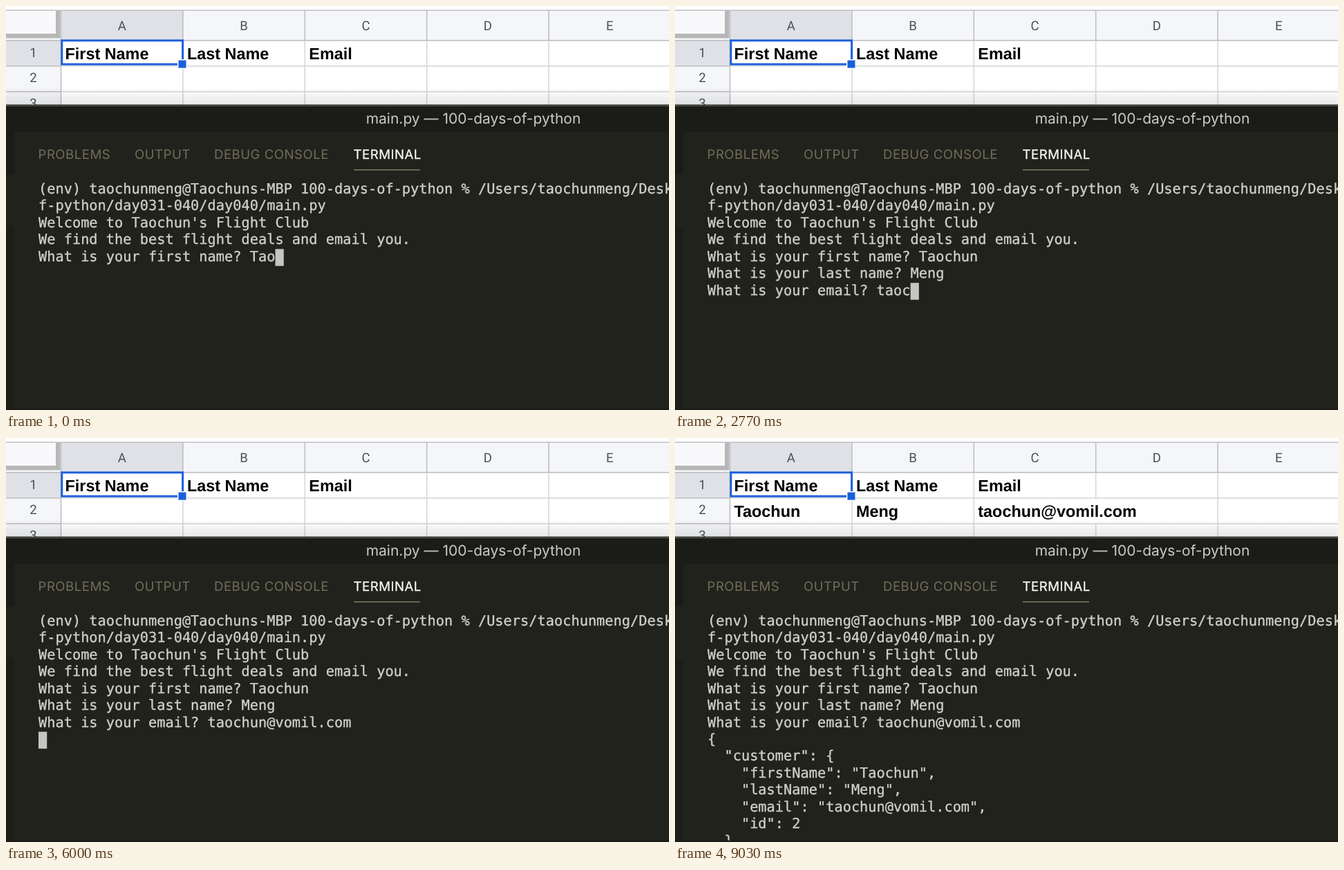
An HTML page that plays this animation: 959 px wide and 584 px high, repeating every 9.51 s.

```html
<!DOCTYPE html>
<html lang="en">
<head>
<meta charset="utf-8">
<title>Flight club sign-up</title>
<style>
  html, body { margin: 0; width: 100%; height: 100%; overflow: hidden; background: #21221c; }
  svg { display: block; width: 959px; height: 584px; }
  text { white-space: pre; text-rendering: geometricPrecision; }
  .head { font: 18.6px Roboto, sans-serif; fill: #4c4f54; text-anchor: middle; }
  .cell { font: bold 23.4px "Liberation Sans", Arial, sans-serif; fill: #000; }
  .title { font: 21px Inter, sans-serif; fill: #cbcbc6; text-anchor: middle; }
  .tab { font: 18.6px Inter, sans-serif; letter-spacing: .5px; fill: #716e58; }
  .tab.active { fill: #f8f8f2; stroke: #f8f8f2; stroke-width: .3px; }
  .term { font: 20.32px "DejaVu Sans Mono", monospace; fill: #d0d0cb; stroke: #d0d0cb; stroke-width: .35px; }
</style>
</head>
<body>
<svg id="stage" viewBox="0 0 959 584">
  <defs>
    <linearGradient id="shade" x1="0" y1="0" x2="0" y2="1">
      <stop offset="0" stop-opacity="0"/>
      <stop offset="1" stop-opacity=".09"/>
    </linearGradient>
  </defs>
  <g id="sheet"></g>
  <g id="window"></g>
  <g id="output"></g>
  <rect y="581.5" width="959" height="2.5" fill="#1b1c18"/>
</svg>
<script>
const LOOP = 9510, JSON_AT = 6700, ROW_AT = 6730;
const CHAR = 12.233, LINE = 24.45, LEFT = 47, TOP = 253.5;
const first = 'Taochun', last = 'Meng', email = 'taochun@vomil.com';

const intro = [
  '(env) taochunmeng@Taochuns-MBP 100-days-of-python % /Users/taochunmeng/Desk',
  'f-python/day031-040/day040/main.py',
  "Welcome to Taochun's Flight Club",
  'We find the best flight deals and email you.'
];

// Each prompt: when it appears, when each key lands, when Enter is pressed.
const prompts = [
  { at: 0, label: 'What is your first name? ', answer: first,
    keys: [0, 0, 0, 30, 130, 200, 300], enter: 470 },
  { at: 470, label: 'What is your last name? ', answer: last,
    keys: [800, 930, 1030, 1100], enter: 1400 },
  { at: 1430, label: 'What is your email? ', answer: email,
    keys: [2300, 2470, 2630, 2770, 2870, 2970, 3070, 3400, 3730,
           3870, 4000, 4100, 4300, 4470, 4630, 4800, 4970], enter: 5430 }
];

const response = JSON.stringify(
  { customer: { firstName: first, lastName: last, email, id: 2 } }, null, 2
).split('\n').slice(0, -1);

function add(parent, tag, attrs, content = '') {
  const el = document.createElementNS('http://www.w3.org/2000/svg', tag);
  for (const key in attrs) el.setAttribute(key, attrs[key]);
  el.textContent = content;
  return parent.appendChild(el);
}
const rect = (parent, x, y, width, height, fill) =>
  add(parent, 'rect', { x, y, width, height, fill });
const label = (parent, cls, x, y, content) =>
  add(parent, 'text', { class: cls, x, y }, content);
const byId = id => document.getElementById(id);

function drawSheet(g) {
  const border = '#bfbfc1', grid = '#d8d8d9';
  const colX = i => 79.5 + 176.4 * i;
  rect(g, 0, 0, 959, 145, '#fff');
  rect(g, 0, 7, 959, 42, '#f5f6fa');
  rect(g, 80, 7, 176, 42, '#dfe1e7');
  rect(g, 0, 49, 79, 95, '#f5f6fa');
  rect(g, 0, 50, 79, 37, '#dfe1e7');
  rect(g, 0, 5.5, 959, 1.5, border);
  for (const y of [86, 123]) {
    rect(g, 80, y, 879, 1.6, grid);
    rect(g, 0, y, 79, 1.6, border);
  }
  [...'ABCDE'].forEach((name, i) => {
    rect(g, colX(i) - .8, 7, 1.6, 43, border);
    rect(g, colX(i) - .8, 50, 1.6, 95, i ? grid : border);
    label(g, 'head', colX(i) + 88.2, 35, name);
  });
  rect(g, 0, 49, 959, 1.6, border);
  rect(g, 0, 7, 78.5, 39.5, '#b7b7b8');
  rect(g, 0, 7, 72, 33, '#f9f9fb');
  [1, 2, 3].forEach(n => label(g, 'head', 39.5, 73.5 + 36.7 * (n - 1), n));

  const writeRow = (parent, y, cells) =>
    cells.forEach((value, i) => label(parent, 'cell', colX(i) + 6, y, value));
  writeRow(g, 77, ['First Name', 'Last Name', 'Email']);
  add(g, 'rect', { x: 80.8, y: 49.9, width: 174.8, height: 34.3,
    fill: 'none', stroke: '#1b5fdc', 'stroke-width': 3 });
  rect(g, 248, 77, 13.5, 13.5, '#fff');
  rect(g, 249.5, 78.5, 11, 11, '#1b5fdc');

  const added = add(g, 'g', {});
  rect(added, 606, 88, 5, 35, '#fff');
  writeRow(added, 113.7, [first, last, email]);
  rect(g, 0, 116, 959, 27, 'url(#shade)');
  return added;
}

function drawWindow(g) {
  rect(g, 0, 142.5, 959, 442, '#1b1c18');
  rect(g, 0, 143.5, 959, 1.5, '#50514d');
  rect(g, 0, 243, 12, 77, '#21221c');
  rect(g, 0, 320, 12, 264, '#1d1e19');
  rect(g, 12, 182, 947, 402, '#21221c');
  label(g, 'title', 676, 170, 'main.py — 100-days-of-python');
  [['PROBLEMS', 46.5], ['OUTPUT', 186], ['DEBUG CONSOLE', 301], ['TERMINAL', 502.5]]
    .forEach(([name, x], i) => label(g, i === 3 ? 'tab active' : 'tab', x, 220.5, name));
  rect(g, 503, 236, 96, 1.7, '#75715e');
}

const addedRow = drawSheet(byId('sheet'));
drawWindow(byId('window'));

const output = byId('output');
const cursor = rect(output, 0, 0, CHAR, LINE, '#c5c5c1');
const writeLine = (row, content) =>
  label(output, 'term', LEFT, TOP + 17.3 + LINE * row, content);
intro.forEach((line, i) => writeLine(i, line));
const inputs = prompts.map((_, i) => writeLine(intro.length + i, ''));
const replies = response.map((line, i) => writeLine(intro.length + prompts.length + i, line));

function show(el, visible) {
  el.setAttribute('visibility', visible ? 'visible' : 'hidden');
}

function render(t) {
  let row = 0, col = 0;
  prompts.forEach((p, i) => {
    const typed = p.keys.filter(at => at <= t).length;
    const content = t < p.at ? '' : p.label + p.answer.slice(0, typed);
    if (inputs[i].textContent !== content) inputs[i].textContent = content;
    if (t < p.at) return;
    const done = t >= p.enter;
    row = intro.length + i + (done ? 1 : 0);
    col = done ? 0 : content.length;
  });
  cursor.setAttribute('x', LEFT + col * CHAR);
  cursor.setAttribute('y', TOP + row * LINE);
  show(cursor, t < JSON_AT);
  replies.forEach(line => show(line, t >= JSON_AT));
  show(addedRow, t >= ROW_AT);
}

const start = performance.now();
function tick() {
  render((performance.now() - start) % LOOP);
  requestAnimationFrame(tick);
}
tick();
</script>
</body>
</html>
```
